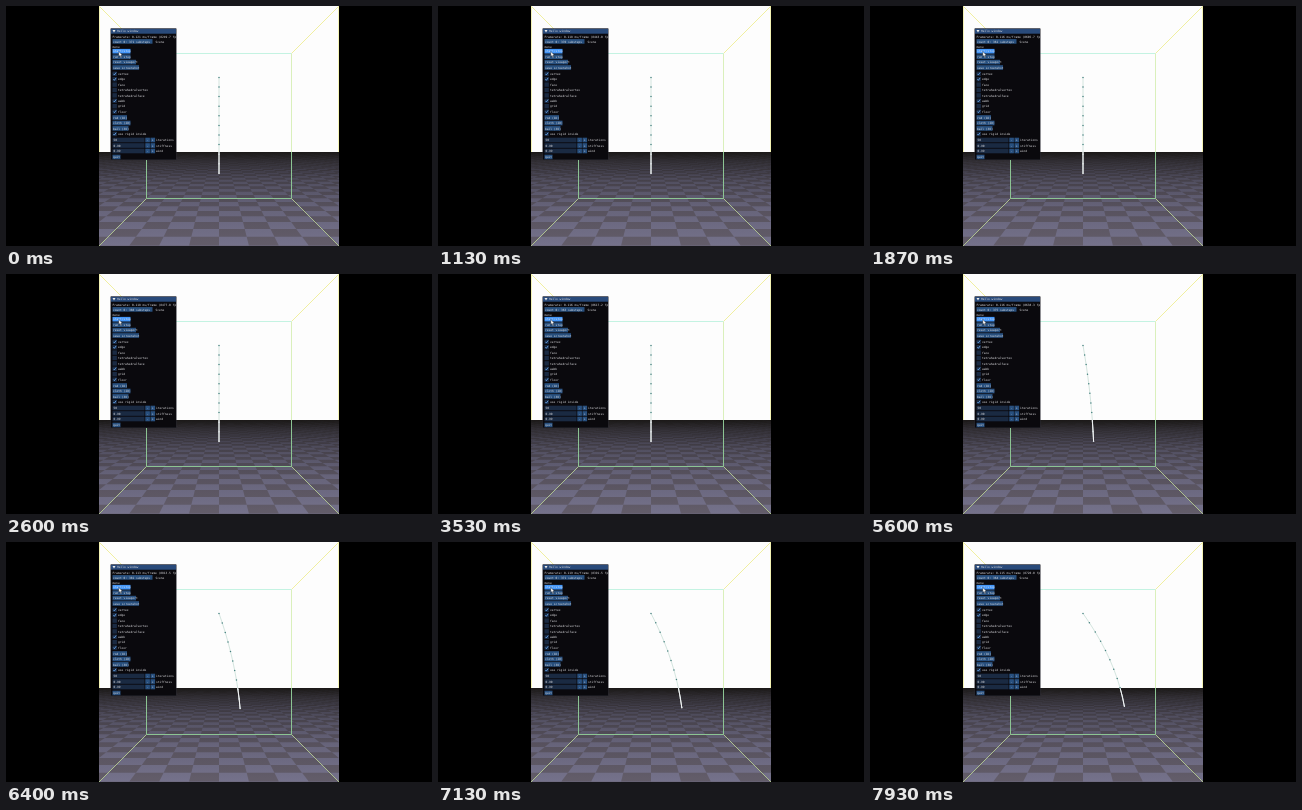
An HTML page for the animation above (8 s loop, 426 px wide and 240 px high).

```html
<!DOCTYPE html>
<html lang="en">
<head>
<meta charset="utf-8">
<title>Rod simulation</title>
<style>
  html, body { margin: 0; width: 100%; height: 100%; overflow: hidden; background: #000; }
  svg { display: block; width: 100vw; height: 100vh; }
  text { font: 2.95px "DejaVu Sans Mono", monospace; fill: #dedee2; white-space: pre; }
  .wire { fill: none; stroke-width: 1; }
</style>
</head>
<body>
<svg id="stage" viewBox="0 0 426 240">
  <defs>
    <clipPath id="view"><rect x="93" width="240" height="240"/></clipPath>
    <clipPath id="window"><rect x="105" y="22.5" width="65" height="131.5"/></clipPath>
    <linearGradient id="fog" x1="0" y1="146" x2="0" y2="240" gradientUnits="userSpaceOnUse">
      <stop offset="0" stop-color="#100e0a" stop-opacity=".88"/>
      <stop offset=".1" stop-color="#100e0c" stop-opacity=".64"/>
      <stop offset=".3" stop-color="#100f12" stop-opacity=".36"/>
      <stop offset=".6" stop-color="#14121a" stop-opacity=".15"/>
      <stop offset="1" stop-color="#14121a" stop-opacity="0"/>
    </linearGradient>
  </defs>
  <rect width="426" height="240"/>
  <g clip-path="url(#view)">
    <rect x="93" width="240" height="146" fill="#fdfdfd"/>
    <rect x="93" y="146" width="240" height="94" fill="#635d6a"/>
    <path id="tiles" fill="#75728b"/>
    <rect x="93" y="146" width="240" height="94" fill="url(#fog)"/>
    <g class="wire">
      <path d="M93.5 0V146M332.5 0V146" stroke="#f3f2b4"/>
      <path d="M93 0 140.5 47.5M285.5 47.5 333 0" stroke="#f0efa0"/>
      <path d="M140.5 47.5H285.5" stroke="#c4f3e2"/>
      <path d="M140.5 47.5V146M285.5 47.5V146" stroke="#daf0bc"/>
      <path d="M140.5 146V192.5H285.5V146" stroke="#8cc493"/>
      <path d="M93 240 140.5 192.5M285.5 192.5 333 240" stroke="#adc08f"/>
    </g>
    <path id="rod" class="wire" stroke="#d4e5df"/>
    <path id="rodLow" class="wire" stroke="#f4f4f6"/>
    <g id="joints"></g>
  </g>
  <g id="panel" clip-path="url(#window)"></g>
  <rect x="104.75" y="22.75" width="65.5" height="131" fill="none" stroke="#26272e" stroke-width=".5"/>
  <path d="M112.8 45.5v5l1.2-1 .8 1.8.8-.4-.8-1.7h1.6z" fill="#fff" stroke="#111" stroke-width=".35"/>
</svg>
<script>
const $ = id => document.getElementById(id);
const LOOP = 8000, STEP = 200 / 3, HORIZON = 146;
const BLUE = '#28507f', HOVER = '#4296fa', FIELD = '#1a2a42', BRIGHT = '#6fb4ff';

function add(parent, tag, attrs, content = '') {
  const node = document.createElementNS('http://www.w3.org/2000/svg', tag);
  for (const key in attrs) node.setAttribute(key, attrs[key]);
  node.textContent = content;
  parent.append(node);
  return node;
}

// Checkered ground in one-point perspective; the box is 8 tiles wide.
function drawFloor() {
  const eyeX = 213, eyeY = 119.9, focal = 366, drop = .5, tile = .125, near = 1.527;
  const point = (x, z) => `${(eyeX + focal * x / z).toFixed(2)} ${(eyeY + focal * drop / z).toFixed(2)}`;
  const far = focal * drop / (HORIZON - eyeY);
  let path = '';
  for (let row = -1; near + row * tile < far; row++) {
    const z0 = near + row * tile, z1 = Math.min(z0 + tile, far);
    const reach = Math.ceil(120 * z1 / focal / tile) + 1;
    for (let col = -reach; col < reach; col++) {
      if ((row + col) & 1) continue;
      const x0 = col * tile, x1 = x0 + tile;
      path += `M${point(x0, z0)}L${point(x1, z0)} ${point(x1, z1)} ${point(x0, z1)}Z`;
    }
  }
  $('tiles').setAttribute('d', path);
}

const panel = $('panel');
const box = (x, y, width, height, fill) => add(panel, 'rect', { x, y, width, height, fill });
const label = (x, y, content) => add(panel, 'text', { x, y: y + 1.1 }, content);

function button(y, width, content, fill = BLUE) {
  box(106.5, y - 2.3, width, 4.6, fill);
  return label(107, y, content);
}

function checkbox(y, content, checked) {
  box(106.5, y - 2.2, 4.4, 4.4, FIELD);
  if (checked) add(panel, 'path', {
    d: `M107.4 ${y}l1 1.1 1.7-2.4`, fill: 'none', stroke: BRIGHT, 'stroke-width': .8
  });
  label(112, y, content);
}

function numberField(y, value, name) {
  box(106.5, y - 2.3, 32, 4.6, FIELD);
  label(107.5, y, value);
  ['-', '+'].forEach((sign, i) => {
    box(139.3 + i * 5.2, y - 2.3, 4.6, 4.6, BLUE);
    label(140.6 + i * 5.2, y, sign);
  });
  label(150, y, name);
}

function drawPanel() {
  box(105, 22.5, 65, 131.5, '#0a090d');
  box(105, 22.5, 65, 5.2, '#294a7a');
  add(panel, 'path', { d: 'M106.5 24h3l-1.5 2.4z', fill: '#eee' });
  label(111, 25.2, 'Hello window');
  const rate = label(106.5, 30.4, '');
  const count = button(35.4, 40, '');
  label(149.5, 35.4, 'Scene');
  label(106.5, 40.6, 'menu');
  button(45.2, 18, 'start/stop', HOVER);
  button(50.7, 18, 'run 1 step');
  button(56.1, 23.5, 'reset viewport');
  button(61.5, 26.5, 'save screenshot');
  [['vertex', 1], ['edge', 1], ['face', 0], ['tetrahedralvertex', 0],
   ['tetrahedralface', 0], ['aabb', 1], ['grid', 0], ['floor', 1]]
    .forEach(([name, on], i) => checkbox(67.8 + i * 5.4, name, on));
  button(111.5, 14.5, 'rod (1D)');
  button(117, 18, 'cloth (2D)');
  button(122.4, 16, 'ball (3D)');
  checkbox(128, 'use rigid inside', 1);
  numberField(134, '50', 'iterations');
  numberField(139.5, '0.90', 'stiffness');
  numberField(145, '0.99', 'wind');
  button(151, 8, 'quit');
  return { rate, count };
}

drawFloor();
const { rate, count } = drawPanel();
const joints = Array.from({ length: 11 }, () => add($('joints'), 'circle', { r: .75 }));

const noise = n => { const v = Math.sin(n * 12.9898) * 43758.5453; return v - Math.floor(v); };

// The tip drifts sideways at a steady rate after a short ease-in.
function tipOffset(time) {
  const t = Math.max(0, time - 4650) / 1000, ease = .3;
  return 13.2 * (t < ease ? t * t / (2 * ease) : t - ease / 2);
}

function drawRod(time) {
  const sway = tipOffset(time), height = 96 - 3 * (sway / 41) ** 2;
  const points = joints.map((joint, i) => {
    const u = i / 10;
    const x = 213 + sway * (1.6 * u - .6 * u * u), y = 71.4 + height * u;
    joint.setAttribute('cx', x);
    joint.setAttribute('cy', y);
    joint.setAttribute('fill', y < HORIZON ? '#44807f' : '#e8eef2');
    return [x, y];
  });
  const toPath = list => 'M' + list.map(p => p.join(' ')).join('L');
  $('rod').setAttribute('d', toPath(points));
  const next = points.findIndex(p => p[1] > HORIZON);
  const [a, b] = [points[next - 1], points[next]];
  const k = (HORIZON - a[1]) / (b[1] - a[1]);
  $('rodLow').setAttribute('d', toPath([[a[0] + k * (b[0] - a[0]), HORIZON], ...points.slice(next)]));
}

function frame(now) {
  const step = Math.floor((now % LOOP) / STEP + .1);
  const ms = .112 + noise(step + 1) * .01;
  rate.textContent = `Framerate: ${ms.toFixed(3)} ms/frame (${(1000 / ms).toFixed(1)} fps)`;
  count.textContent = `count 0: ${360 + Math.floor(noise(step + 70) * 30)} substeps`;
  drawRod(step * STEP);
  requestAnimationFrame(frame);
}
requestAnimationFrame(frame);
</script>
</body>
</html>
```
